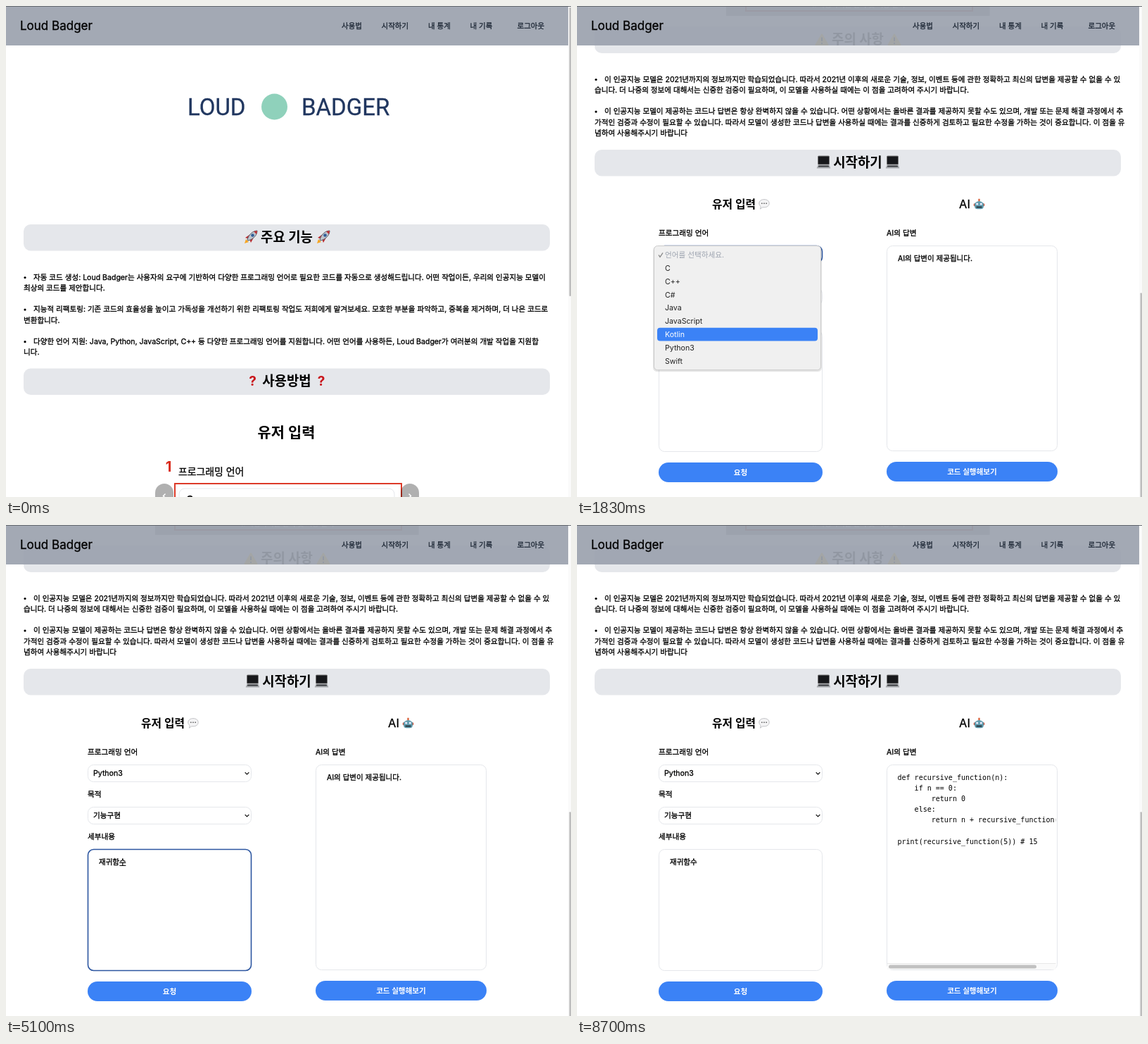
Write an HTML page that moves like this. It is 803x697 px and loops after 8.79 s.

```html
<!DOCTYPE html>
<html lang="ko">
<head>
<meta charset="utf-8">
<style>
  html, body { margin: 0; width: 100%; height: 100%; overflow: hidden; background: #fff; }
  svg { display: block; width: 803px; height: 697px; }
  text { font-family: Inter, "Noto Sans CJK KR", "Noto Sans CJK", sans-serif; white-space: pre; }
  .medium { fill: currentColor; stroke: currentColor; stroke-width: .3px; }
  .code { font-family: "DejaVu Sans Mono", monospace; }
  .logo { font-family: Roboto, sans-serif; color: #20365f; }
</style>
</head>
<body>
<svg id="stage" viewBox="0 0 803 697">
  <defs>
    <symbol id="rocket" viewBox="0 0 20 20">
      <path d="M1 19l2-6 4 4z" fill="#f5a623"/>
      <path d="M2 11l7-5 5 5-4 7-2-5z" fill="#b92f33"/>
      <path d="M5 14C7 6 13 1 19 1c0 6-5 12-13 14z" fill="#bfc5cd" stroke="#59616d"/>
      <path d="M14 2l5-1-1 5z" fill="#c02f32"/>
      <circle cx="12.500" cy="7.500" r="2.300" fill="#2f5e98"/>
    </symbol>
    <symbol id="warn" viewBox="0 0 20 20">
      <path d="M10 3L18.500 17.500H1.500z" fill="#fdc726" stroke="#fdc726" stroke-width="2" stroke-linejoin="round"/>
      <path d="M10 7v5.500M10 14.500v2" stroke="#222" stroke-width="2"/>
    </symbol>
    <symbol id="laptop" viewBox="0 0 20 20">
      <rect x="2" y="1" width="16" height="12" rx="1" fill="#17181b" stroke="#777"/>
      <path d="M2 13.500h16l2 5H0z" fill="#a9acb0"/>
      <path d="M3 14.500h14l.8 2H2.200z" fill="#3b3d40"/>
    </symbol>
    <symbol id="bubble" viewBox="0 0 20 20">
      <path d="M10 2c5.500 0 9 3 9 7s-3.500 7-9 7H7l-4 3 1-4.500C2 13 1 11 1 9c0-4 3.500-7 9-7z" fill="#f4f4f5" stroke="#b5b6ba"/>
      <path d="M5 9h2m2 0h2m2 0h2" stroke="#666" stroke-width="2"/>
    </symbol>
    <symbol id="robot" viewBox="0 0 20 20">
      <path d="M10 1v5" stroke="#d9633e" stroke-width="3"/>
      <rect x="0" y="9" width="20" height="5" rx="2" fill="#c9563f"/>
      <path d="M2 9q8-8 16 0v5q0 5-5 5H7q-5 0-5-5z" fill="#609bad"/>
      <circle cx="6.500" cy="10" r="2" fill="#eef"/><circle cx="13.500" cy="10" r="2" fill="#eef"/>
      <path d="M5 15.500h10" stroke="#26333b" stroke-width="2.500"/>
    </symbol>
    <clipPath id="answerClip"><rect x="441" y="341" width="239.500" height="290"/></clipPath>
  </defs>
</svg>
<script>
const LOOP = 8790, SCROLL = 796, BODY = 10.55, LABEL = 10.6;
const GRAY = '#9ca3af', LINE = '#e5e7eb', FOCUS = '#2c56a0', BLUE = '#3b82f6';

// y is the visual middle of the line
const text = (x, y, size, str, attrs = '') =>
  `<text x="${x}" y="${(y + size * .36).toFixed(2)}" font-size="${size}" ${attrs}>${str}</text>`;
const rect = (x, y, w, h, r, attrs) =>
  `<rect x="${x}" y="${y}" width="${w}" height="${h}" rx="${r}" ${attrs}/>`;
const icon = (id, x, y, size) => `<use href="#${id}" x="${x}" y="${y}" width="${size}" height="${size}"/>`;
const chevron = (x, y, s, attrs = '') =>
  `<path d="M${x - s} ${y - s / 2}l${s} ${s}l${s} ${-s}" fill="none" stroke="#111" stroke-width="1.3" ${attrs}/>`;
const field = (id, x, y, w, h) =>
  rect(x + .5, y + .5, w - 1, h - 1, 8, `id="${id}" fill="#fff" stroke="${LINE}"`);
const MID = 'text-anchor="middle"', MEDIUM = 'class="medium"', BOLD = 'font-weight="700"';

function bar(y, title, glyph, left, right) {
  const side = x => glyph === '?'
    ? text(x + 9.5, y + 17.5, 19, '?', `${MID} ${BOLD} fill="#c9151b"`)
    : icon(glyph, x, y + 8, 20);
  return rect(25, y, 748, 37.5, 10, `fill="${LINE}"`) + side(left) + side(right)
    + text(399, y + 18, 18.9, title, `${MID} ${BOLD}`);
}

const bullets = (y, items) => items.map(lines => {
  const out = `<circle cx="27" cy="${y + .5}" r="1.6"/>` + lines.map((s, i) =>
    text(i ? 25 : 39, y + i * 15.2, BODY, s, MEDIUM)).join('');
  y += lines.length * 15.2 + 15.2;
  return out;
}).join('');

function slideField(y, num, numY, label, value) {
  return text(231, numY, 20, num, `${MID} ${BOLD} fill="#d92b1c"`)
    + text(245, y - 17.5, 13.9, label, MEDIUM)
    + rect(246, y + 7, 306, 32, 8, `fill="#fff" stroke="${LINE}"`)
    + text(256, y + 23, 14.2, value, MEDIUM) + chevron(545, y + 24, 3.5)
    + rect(240, y, 322, 46, 0, 'fill="none" stroke="#dc3a28" stroke-width="2"');
}

const pill = (x, dir) => rect(x, 678, 26, 36, 13, 'fill="#000" opacity=".31"')
  + `<path d="M${x + 13 - dir * 1.5} 692.5l${dir * 3} 3l${-dir * 3} 3" fill="none" stroke="#fff" stroke-width="1.5"/>`;

const button = (x, y, w, label) => rect(x, y, w, 28, 14, `fill="${BLUE}"`)
  + text(x + w / 2, y + 13.7, LABEL, label, `${MID} ${BOLD} fill="#fff"`);

function menu(id, top, pitch, pad, items) {
  const h = items.length * pitch + 2 * pad;
  return `<g id="${id}">` + rect(108, top + 1, 240, h + 1, 6, 'fill="#000" opacity=".1"')
    + rect(109.5, top + .5, 237, h - 1, 5, 'fill="#f0f0f0" stroke="#cbcbcb"')
    + rect(114, 0, 228, pitch, 4, `class="hot" fill="${BLUE}"`)
    + `<path d="M116 ${top + pad + pitch / 2}l2 3l4 -6" fill="none" stroke="#888" stroke-width="1.3"/>`
    + items.map((s, i) => text(125, top + pad + pitch * (i + .5), LABEL, s, 'class="item"')).join('') + '</g>';
}

const LANG_HINT = '언어를 선택하세요.', GOAL_HINT = '목적을 선택하세요.';
const MENUS = {
  langMenu: { top: 340, pitch: 18.8, pad: 4, items: [LANG_HINT, 'C', 'C++', 'C#', 'Java', 'JavaScript', 'Kotlin', 'Python3', 'Swift'] },
  goalMenu: { top: 400, pitch: 18, pad: 3, items: [GOAL_HINT, '기능구현', '리팩토링'] }
};
const CODE = `def recursive_function(n):
    if n == 0:
        return 0
    else:
        return n + recursive_function(n-1)

print(recursive_function(5)) # 15`;
const TYPED = ['ㅈ', '재', '잭', '재구', '재귀', '재귛', '재귀하', '재귀함', '재귀함ㅅ', '재귀함수'];

const intro =
  text(258, 143, 33, 'LOUD', 'class="logo medium"')
  + '<circle cx="381.500" cy="143" r="18.500" fill="#8fd1bb"/>'
  + text(420, 143, 33, 'BADGER', 'class="logo medium"')
  + bar(310, '주요 기능', 'rocket', 338, 441)
  + bullets(385, [
    ['자동 코드 생성: Loud Badger는 사용자의 요구에 기반하여 다양한 프로그래밍 언어로 필요한 코드를 자동으로 생성해드립니다. 어떤 작업이든, 우리의 인공지능 모델이', '최상의 코드를 제안합니다.'],
    ['지능적 리팩토링: 기존 코드의 효율성을 높이고 가독성을 개선하기 위한 리팩토링 작업도 저희에게 맡겨보세요. 모호한 부분을 파악하고, 중복을 제거하며, 더 나은 코드로', '변환합니다.'],
    ['다양한 언어 지원: Java, Python, JavaScript, C++ 등 다양한 프로그래밍 언어를 지원합니다. 어떤 언어를 사용하든, Loud Badger가 여러분의 개발 작업을 지원합', '니다.']])
  + bar(514.5, '사용방법', '?', 341, 438.5)
  + text(398.5, 606, 20.8, '유저 입력', `${MID} font-weight="600"`)
  + slideField(678, '1', 654, '프로그래밍 언어', 'C')
  + slideField(757, '2', 738.5, '목적', '기능구현')
  + rect(212, 779.5, 374.5, 30.5, 0, 'fill="#000" opacity=".39"')
  + text(399.5, 794, 10.3, '1. 사용하려는 언어 및 기능 선택', `${MID} ${BOLD} fill="#fff"`)
  + pill(212, -1) + pill(561, 1)
  + bar(825.5, '주의 사항', 'warn', 338, 441)
  + bullets(900, [
    ['이 인공지능 모델은 2021년까지의 정보까지만 학습되었습니다. 따라서 2021년 이후의 새로운 기술, 정보, 이벤트 등에 관한 정확하고 최신의 답변을 제공할 수 없을 수 있', '습니다. 더 나중의 정보에 대해서는 신중한 검증이 필요하며, 이 모델을 사용하실 때에는 이 점을 고려하여 주시기 바랍니다.'],
    ['이 인공지능 모델이 제공하는 코드나 답변은 항상 완벽하지 않을 수 있습니다. 어떤 상황에서는 올바른 결과를 제공하지 못할 수도 있으며, 개발 또는 문제 해결 과정에서 추', '가적인 검증과 수정이 필요할 수 있습니다. 따라서 모델이 생성한 코드나 답변을 사용하실 때에는 결과를 신중하게 검토하고 필요한 수정을 가하는 것이 중요합니다. 이 점을 유', '념하여 사용해주시기 바랍니다']])
  + bar(1000, '시작하기', 'laptop', 340.5, 438.5);

const form =
  text(192, 281, 15.8, '유저 입력', 'font-weight="600"') + icon('bubble', 258, 273, 16)
  + text(543, 281.5, 16.5, 'AI', MEDIUM) + icon('robot', 563.5, 273, 16)
  + text(116, 322, LABEL, '프로그래밍 언어', MEDIUM) + text(440, 322, LABEL, 'AI의 답변', MEDIUM)
  + field('langBox', 116, 340, 233, 25) + text(124, 352.5, LABEL, '', `id="lang" ${MEDIUM}`) + chevron(342.5, 352.5, 2.8, 'id="langArrow"')
  + text(116, 382, LABEL, '목적', MEDIUM)
  + field('goalBox', 116, 400, 233, 25) + text(124, 412.5, LABEL, '', `id="goal" ${MEDIUM}`) + chevron(342.5, 412.5, 2.8, 'id="goalArrow"')
  + text(116, 442, LABEL, '세부내용', MEDIUM)
  + field('area', 116, 460, 233, 173) + text(132, 478, 10.5, '', `id="detail" ${MEDIUM}`)
  + rect(0, 483, 9, 1, 0, 'id="mark"') + rect(0, 472, 1, 12, 0, 'id="caret"')
  + button(116, 648, 233, '요청')
  + field('answerBox', 440, 340, 243, 292)
  + text(456, 358, 10.5, 'AI의 답변이 제공됩니다.', `id="hint" ${MEDIUM}`)
  + '<circle id="spin" cx="561" cy="486" r="14" fill="none" stroke="#3f80e0" stroke-width="3" pathLength="360" stroke-dasharray="270 90"/>'
  + '<g clip-path="url(#answerClip)">'
  + CODE.split('\n').map((_, i) => text(455.5, 358 + i * 15.17, 10.03, '', 'class="code line"')).join('')
  + '<g id="hbar">' + rect(441, 622, 241, 10, 0, 'fill="#fafafa"') + rect(441, 622, 241, 1, 0, 'fill="#e8e8e8"')
  + rect(443, 624.5, 210, 5, 2.5, 'fill="#c1c1c1"') + '</g></g>'
  + button(440, 647, 243, '코드 실행해보기')
  + Object.entries(MENUS).map(([id, m]) => menu(id, m.top, m.pitch, m.pad, m.items)).join('');

const nav = [[477, '사용법'], [533.5, '시작하기'], [600, '내 통계'], [659.5, '내 기록'], [726.5, '로그아웃']];
const header = rect(0, 0, 799, 56, 0, `fill="${GRAY}" opacity=".93"`)
  + text(20, 28, 17, 'Loud Badger', MEDIUM)
  + nav.map(([x, s], i) => text(x, 28, 10.5, s, `id="nav${i}" color="#1f2937" ${MEDIUM}`)).join('')
  + rect(0, 0, 803, 1, 0, 'fill="#666a70"')
  + rect(799, 1, 4, 696, 0, 'fill="#fafafa"') + rect(800.5, 0, 2.5, 410, 1.2, 'id="thumb" fill="#bdbdbd"')
  + `<path id="hand" d="M559 28.500v6l-1.500-1.500-1 1 2.500 4h5l1-5-1.500-1-1.500-.5-1.500-.5v-2.500q-.7-1-1.500 0z"
      fill="#fff" stroke="#222" stroke-width=".9" stroke-linejoin="round"/>`;

const stage = document.getElementById('stage');
stage.insertAdjacentHTML('beforeend',
  `<g id="page">${intro}<g transform="translate(0 ${SCROLL})">${form}</g></g>${header}`);

const $ = id => document.getElementById(id);
const set = (id, attrs) => { for (const k in attrs) $(id).setAttribute(k, attrs[k]); };
const show = (id, on) => set(id, { opacity: +on });
const between = (t, a, b) => t >= a && t < b;
const ramp = (t, a, b) => Math.max(0, Math.min(1, (t - a) / (b - a)));

// cubic-bezier(.42, 0, .58, 1), solved for x by bisection
function easeInOut(x) {
  let lo = 0, hi = 1, u;
  for (let i = 0; i < 20; i++) {
    u = (lo + hi) / 2;
    if (3 * u * (1 - u) * (.42 * (1 - u) + .58 * u) + u ** 3 < x) lo = u; else hi = u;
  }
  return u * u * (3 - 2 * u);
}

function focus(id, on) {
  set(id, { stroke: on ? FOCUS : LINE, 'stroke-width': on ? 1.6 : 1 });
}

function choose(name, chosen, value, hint) {
  $(name).textContent = chosen ? value : hint;
  set(name, { color: chosen ? '#000' : GRAY });
  set(name + 'Arrow', { stroke: chosen ? '#111' : GRAY });
}

function drawMenu(id, alpha, hot) {
  const { top, pitch, pad } = MENUS[id], el = $(id);
  show(id, alpha);
  const mark = el.querySelector('.hot');
  mark.setAttribute('y', top + pad + hot * pitch);
  mark.setAttribute('opacity', +(hot > 0));
  el.querySelectorAll('.item').forEach((item, i) =>
    item.setAttribute('fill', !i ? GRAY : i === hot ? '#fff' : '#222'));
}

const fading = (t, open, close, end) => t < open ? 0 : 1 - ramp(t, close, end);

function draw(t) {
  const y = Math.round(SCROLL * easeInOut(ramp(t, 654, 1200)));
  set('page', { transform: `translate(0 ${-y})` });
  set('thumb', { y: 2 + y * .509 });
  const hover = between(t, 540, 1200);
  set('nav1', { color: hover ? '#fff' : '#1f2937' });
  show('hand', hover);

  choose('lang', t >= 2100, 'Python3', LANG_HINT);
  choose('goal', t >= 3300, '기능구현', GOAL_HINT);
  focus('langBox', between(t, 1500, 2460));
  focus('goalBox', between(t, 2460, 3450));
  focus('area', between(t, 3450, 6090));
  drawMenu('langMenu', fading(t, 1500, 2070, 2280), t < 1650 ? 0 : Math.min(7, 1 + Math.floor((t - 1650) / 35)));
  drawMenu('goalMenu', t < 2880 ? fading(t, 2460, 2580, 2730) : fading(t, 2880, 3270, 3450), +(t >= 3060));

  const step = t < 3900 ? -1 : t < 4050 ? 0 : Math.min(9, 1 + Math.floor((t - 4050) / 45));
  const typed = TYPED[step] || '', end = 132 + typed.length * 9.66;
  $('detail').textContent = typed || '코드나 요청사항을 입력하세요.';
  set('detail', { color: typed ? '#000' : GRAY });
  set('mark', { x: end - 9.3 });
  show('mark', typed && t < 6090);
  set('caret', { x: typed ? end - .3 : 132 });
  show('caret', between(t, 3450, 3690) || between(t, 3900, 4620) || between(t, 4770, 5100));

  show('hint', t < 6090);
  show('spin', between(t, 6090, 6990));
  set('spin', { transform: `rotate(${170 + (t - 6930) * .8} 561 486)` });

  const count = t < 6990 ? 0
    : Math.round(4 + 68 * ramp(t, 6990, 7320) + (CODE.length - 72) * ramp(t, 7800, 8520));
  const lines = CODE.slice(0, count).split('\n');
  document.querySelectorAll('.line').forEach((el, i) => el.textContent = lines[i] || '');
  show('hbar', count > 106);
}

function frame() {
  draw(performance.now() % LOOP);
  requestAnimationFrame(frame);
}
frame();
</script>
</body>
</html>
```
